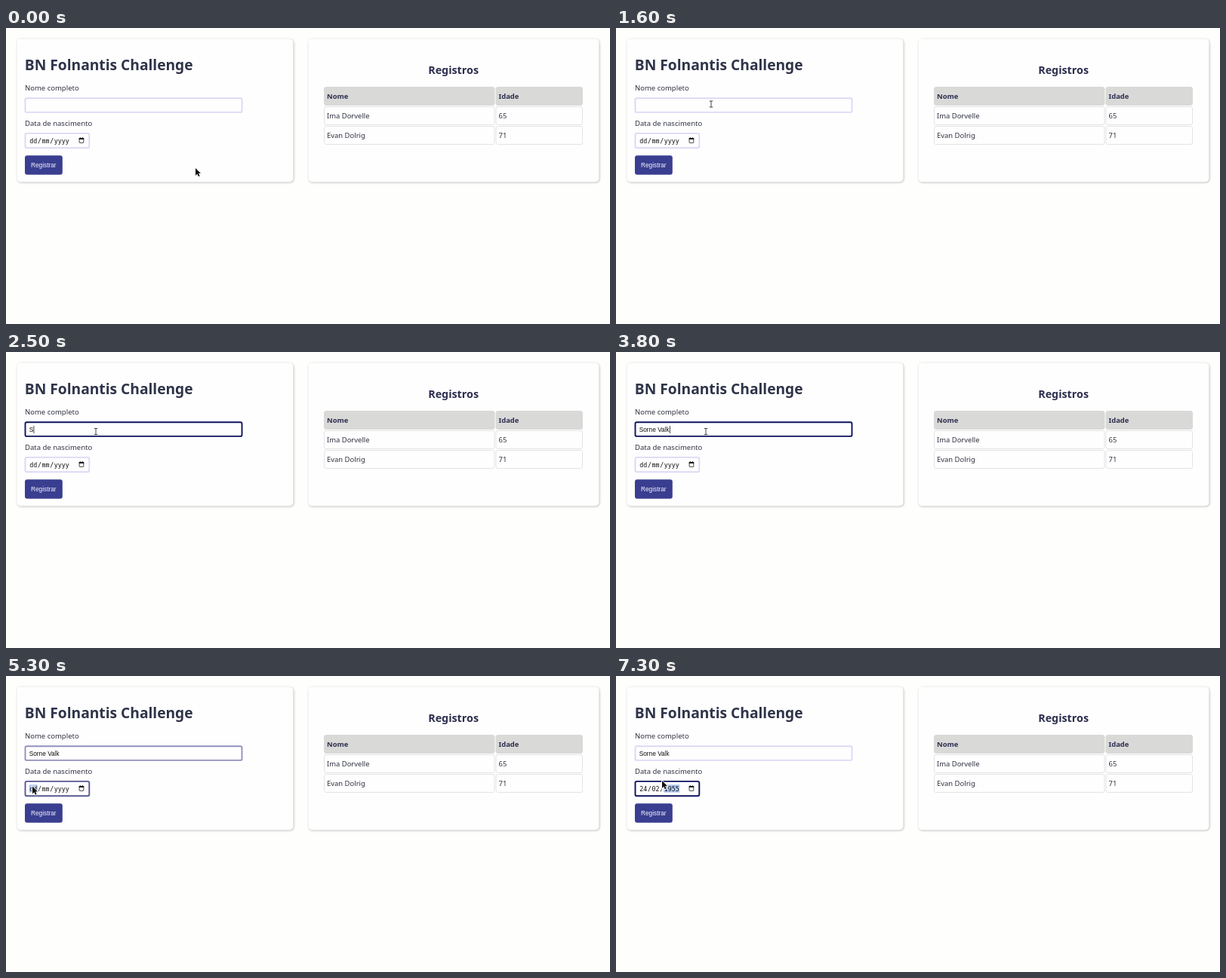
Write an HTML page with a canvas that moves like this. It is 800 px wide and 393 px high and loops after 8 s.

```html
<!DOCTYPE html>
<html lang="pt">
<head>
<meta charset="utf-8">
<style>
  html, body { margin: 0; width: 100%; height: 100%; overflow: hidden; background: #fefefc; }
  canvas { display: block; width: 800px; height: 393px; }
</style>
</head>
<body>
<canvas id="stage"></canvas>
<script>
const W = 800, H = 393, LOOP = 8000, STEP = 100;
const canvas = document.getElementById('stage');
const ctx = canvas.getContext('2d');
const dpr = window.devicePixelRatio || 1;
canvas.width = W * dpr;
canvas.height = H * dpr;

const SANS = '"Noto Sans", "Open Sans", sans-serif';
const ARIAL = '"Liberation Sans", Arial, sans-serif';
const MONO = '"DejaVu Sans Mono", monospace';
const INK = '#2f3340', HEAD = '#2e3449', TITLE = '#2d2f4e';
const IDLE = [219, 217, 245], FOCUS = [13, 17, 92];

const NAME = 'Sorne Valk';
const NAME_CLICK = 2080, DATE_CLICK = 5180, FADE = 300;

// [time, typed characters]
const TYPING = [[0, 0], [2500, 1], [2800, 2], [2900, 3], [3000, 4], [3200, 6],
  [3400, 7], [3500, 8], [3700, 9], [3800, 10]];

// [time, day, month, year, selected part]
const DATES = [
  [0, 'dd', 'mm', 'yyyy', -1],
  [DATE_CLICK, 'dd', 'mm', 'yyyy', 0],
  [5900, '02', 'mm', 'yyyy', 0],
  [6100, '24', 'mm', 'yyyy', 1],
  [6300, '24', '00', 'yyyy', 1],
  [6500, '24', '02', 'yyyy', 2],
  [6800, '24', '02', '0001', 2],
  [6900, '24', '02', '0019', 2],
  [7100, '24', '02', '0195', 2],
  [7300, '24', '02', '1955', 2]
];

// [start, end, x, y] of each pointer move
const MOVES = [
  [700, 1600, 126, 101],
  [1600, 2100, 119, 105.5],
  [4500, 5200, 35, 146.5],
  [5300, 5600, 61, 139]
];

const clamp = v => Math.max(0, Math.min(1, v));
const mix = (a, b, k) => a + (b - a) * k;
const smooth = k => k * k * (3 - 2 * k);
const easeOut = k => 1 - (1 - k) ** 2;
const latest = (list, t) => list.filter(e => e[0] <= t).pop();
const fade = (t, start) => easeOut(clamp((t - start) / FADE));

function text(str, x, y, size, color = INK, family = SANS, weight = 400, align = 'left') {
  ctx.font = `${weight} ${size}px ${family}`;
  ctx.textAlign = align;
  ctx.fillStyle = color;
  ctx.fillText(str, x, y);
}

function box(x, y, w, h, r, fill, stroke, line = 1) {
  ctx.beginPath();
  ctx.roundRect(x, y, w, h, r);
  if (fill) { ctx.fillStyle = fill; ctx.fill(); }
  if (stroke) { ctx.strokeStyle = stroke; ctx.lineWidth = line; ctx.stroke(); }
}

function card(x, w) {
  ctx.save();
  ctx.shadowColor = 'rgba(0,0,0,.28)';
  ctx.shadowBlur = 3 * dpr;
  ctx.shadowOffsetX = ctx.shadowOffsetY = 0.7 * dpr;
  box(x, 14.5, w, 190, 5, '#fffefe');
  ctx.restore();
}

function field(x, y, w, h, focus) {
  const rgb = IDLE.map((c, i) => Math.round(mix(c, FOCUS[i], focus)));
  box(x, y, w, h, 2, '#fffeff', `rgb(${rgb})`, 1.9);
}

function tableRow(y, name, age, head) {
  const fill = head ? '#d9d9d8' : '#fffefe';
  const line = head ? '#d9d9d8' : '#e4e3e5';
  box(421.5, y, 225.5, 24, 2.5, fill, line);
  box(649, y, 114.5, 24, 2.5, fill, line);
  const weight = head ? 700 : 400, color = head ? TITLE : INK;
  text(name, 425, y + 15.5, 9.45, color, SANS, weight);
  text(age, 652.5, y + 15.5, 9.45, color, SANS, weight);
}

function nameField(t) {
  const focus = fade(t, NAME_CLICK) * (1 - fade(t, DATE_CLICK));
  field(25.5, 93.3, 287, 18.6, focus);
  const typed = NAME.slice(0, latest(TYPING, t)[1]);
  text(typed, 30.7, 105.8, 8.3, '#111', ARIAL);
  const blinkOff = t >= 4400 && t < 4900;
  if (t >= NAME_CLICK && t < DATE_CLICK && !blinkOff) {
    ctx.fillStyle = '#222';
    ctx.fillRect(31 + ctx.measureText(typed).width, 98, 0.8, 10);
  }
}

function calendarIcon(x, y) {
  ctx.fillStyle = '#1a1a1a';
  ctx.fillRect(x + 1.2, y - 0.8, 0.9, 1.5);
  ctx.fillRect(x + 4.4, y - 0.8, 0.9, 1.5);
  ctx.fillRect(x, y, 6.5, 2);
  box(x + 0.4, y + 0.4, 5.7, 6, 0.6, null, '#1a1a1a', 0.8);
}

function dateField(t) {
  field(25.5, 139.9, 84.8, 19.4, fade(t, DATE_CLICK));
  const [, day, month, year, selected] = latest(DATES, t);
  [[day, 31.2], [month, 47.6], [year, 63.8]].forEach(([part, x], i) => {
    if (i === selected) {
      ctx.fillStyle = '#b3c9f5';
      ctx.fillRect(x - 0.7, 144.3, part.length * 5 + 1.3, 10.4);
    }
    text(part, x, 152.7, 8.3, '#111', MONO);
  });
  text('/', 42, 152.7, 8.3, '#111', MONO);
  text('/', 58.3, 152.7, 8.3, '#111', MONO);
  calendarIcon(96.7, 146);
}

function pointerAt(t) {
  let x = 251, y = 186;
  for (const [start, end, toX, toY] of MOVES) {
    const k = smooth(clamp((t - start) / (end - start)));
    x = mix(x, toX, k);
    y = mix(y, toY, k);
  }
  return [x, y];
}

function arrow(x, y) {
  const shape = [[0, 0], [0, 9.9], [2.3, 7.8], [3.9, 11.3], [5.6, 10.5], [4.1, 7.1], [7, 7]];
  ctx.beginPath();
  shape.forEach(([dx, dy]) => ctx.lineTo(x + dx, y + dy));
  ctx.closePath();
  ctx.strokeStyle = '#fff';
  ctx.lineWidth = 1.5;
  ctx.stroke();
  ctx.fillStyle = '#111';
  ctx.fill();
}

function beam(x, y) {
  const path = new Path2D();
  path.moveTo(x - 2.3, y - 4);
  path.lineTo(x + 2.3, y - 4);
  path.moveTo(x, y - 4);
  path.lineTo(x, y + 4);
  path.moveTo(x - 2.3, y + 4);
  path.lineTo(x + 2.3, y + 4);
  for (const [color, width] of [['#fff', 2], ['#333', 0.9]]) {
    ctx.strokeStyle = color;
    ctx.lineWidth = width;
    ctx.stroke(path);
  }
}

function pointer(t) {
  const [x, y] = pointerAt(t);
  const inName = x > 25 && x < 313 && y > 92 && y < 113;
  (inName ? beam : arrow)(x, y);
}

function draw(t) {
  ctx.setTransform(dpr, 0, 0, dpr, 0, 0);
  ctx.fillStyle = '#fefefc';
  ctx.fillRect(0, 0, W, H);

  card(14.5, 366);
  text('BN Folnantis Challenge', 24.8, 56, 19.2, HEAD, SANS, 700);
  text('Nome completo', 25, 83, 9.5);
  text('Data de nascimento', 25, 129.6, 9.5);
  nameField(t);
  dateField(t);
  box(25, 169.3, 49.8, 25.4, 3, '#393e90');
  text('Registrar', 49.8, 185, 8.3, '#f4f4fb', ARIAL, 400, 'center');

  card(400.5, 385);
  text('Registros', 592.6, 60.6, 14.3, TITLE, SANS, 700, 'center');
  tableRow(78.5, 'Nome', 'Idade', true);
  tableRow(104.5, 'Ima Dorvelle', '65');
  tableRow(130.5, 'Evan Dolrig', '71');

  pointer(t);
}

const begin = performance.now();
function tick() {
  const t = (performance.now() - begin) % LOOP;
  draw(Math.floor(t / STEP) * STEP);
  requestAnimationFrame(tick);
}
tick();
</script>
</body>
</html>
```
